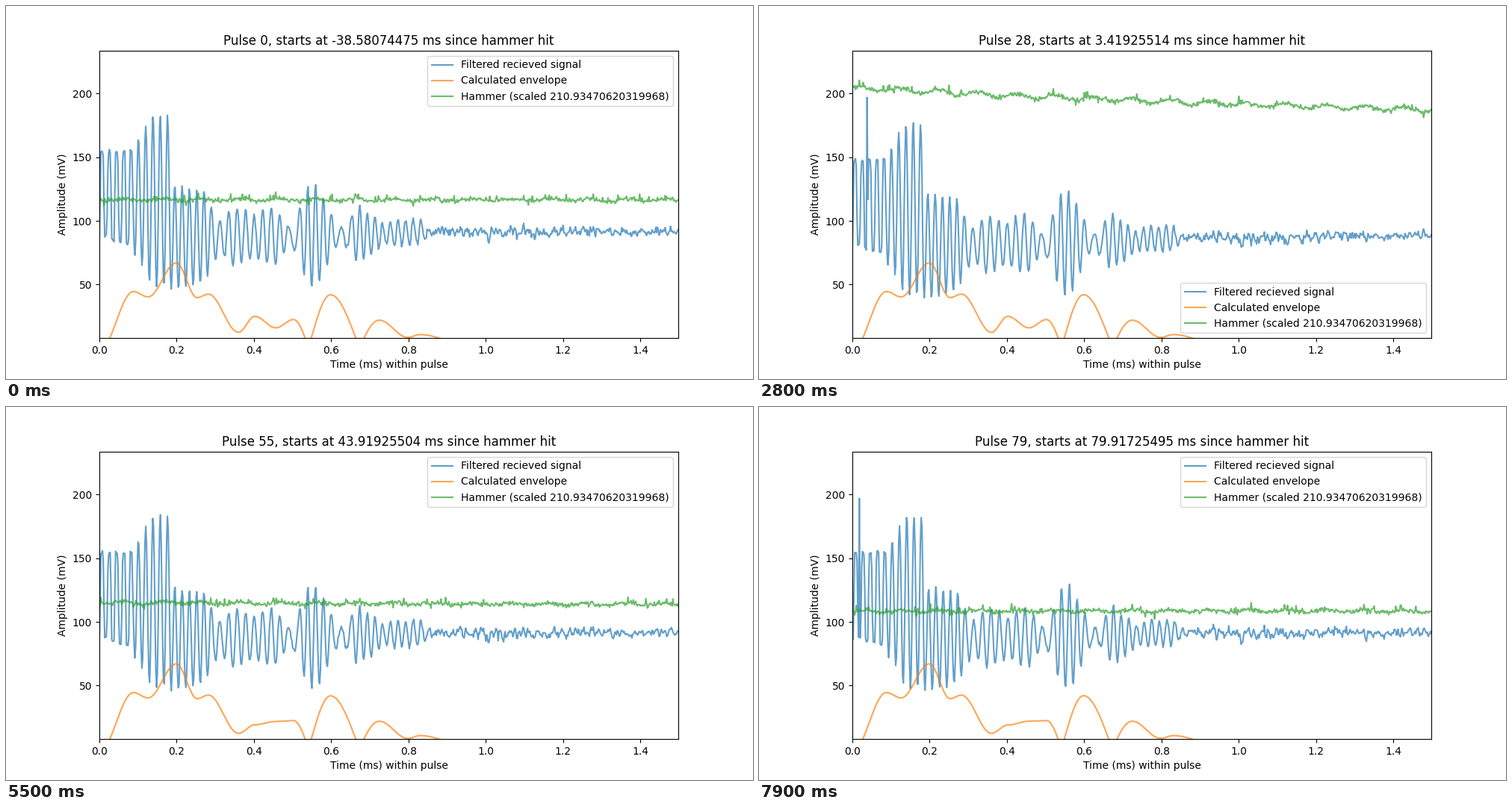
Animation of 1000 by 500 pixels, one loop 8 s. Source, as a matplotlib script:

```python
import numpy as np
import matplotlib.pyplot as plt
from matplotlib.animation import FuncAnimation

PULSES, STEP, DT, N = 80, 1.5, 0.002, 750
LATE = 60  # from this pulse on the trigger comes one sample early
time = np.arange(N) * DT


def ease(x, points):
    """Half-cosine interpolation through (x, y) turning points."""
    xs, ys = np.array(points, float).T
    j = np.clip(np.searchsorted(xs, x, side="right") - 1, 0, len(xs) - 2)
    f = np.clip((x - xs[j]) / (xs[j + 1] - xs[j]), 0, 1)
    return ys[j] + (ys[j + 1] - ys[j]) * (1 - np.cos(np.pi * f)) / 2


def line(x, points):
    return np.interp(x, *np.array(points, float).T)


def bell(x, centre, width):
    return np.exp(-((x - centre) / width) ** 2)


def start_of(n):
    return -38.58074475 + n * (STEP - 3.8e-9) - DT * (n >= LATE)


# Carrier: cycles counted against time, strength and centre line
CYCLES = [(0.0068, 0), (0.2895, 15), (0.3344, 17), (0.489, 24), (0.519, 25),
          (0.5998, 29), (0.6263, 30), (0.6539, 31), (0.852, 41), (1.5, 73)]
STRENGTH = [(0, 33), (0.08, 36), (0.1, 49), (0.14, 68), (0.181, 67), (0.19, 41),
            (0.26, 37), (0.313, 14), (0.345, 23), (0.4, 18), (0.45, 22),
            (0.495, 8), (0.55, 41), (0.627, 8), (0.672, 21), (0.74, 10),
            (0.82, 10), (0.865, 1.2)]
CENTRE = [(0, 121), (0.08, 119), (0.1, 116), (0.181, 116), (0.19, 87),
          (0.5, 88), (0.85, 91), (1.5, 91.5)]
SATURATED = 0.085  # the receiver clips the first few cycles
CYCLE_0 = 52.5 * 0.0068

# Noise that repeats in every pulse
fixed = np.convolve(np.random.default_rng(5).normal(0, 1.4, N), [0.5, 1, 0.5], "same")
fixed += 5 * bell(time, 1.025, 0.003) - 6 * bell(time, 1.009, 0.003)


def received(n, rng):
    t = time - DT * (n >= LATE)
    cycle = line(t, CYCLES) + np.minimum(0, 52.5 * t - CYCLE_0)
    wave = np.cos(2 * np.pi * cycle)
    wave = np.where(t < SATURATED, np.clip(1.8 * wave, -1, 1), wave)
    strength = ease(t, STRENGTH) * (1 + 0.5 * bell(n, 43, 6) * bell(t, 0.36, 0.03))
    y = line(t, CENTRE) + strength * wave
    fade = line(time, [(0, 0.5), (0.8, 0.6), (0.9, 1), (1.1, 0.9), (1.5, 0.7)])
    y += fade * (fixed + rng.normal(0, 1.3, N))
    y += line(start_of(n) + time, [(0, 0), (0.5, -9), (3.4, -7), (4.9, -3), (9, 0)])
    if rng.random() < 0.5:
        y[rng.integers(8, 50)] = rng.choice([50, 191, 197])
    return y


def envelope(n):
    """Signed so that the curve folds sharply where it passes zero."""
    ring = bell(n, 43, 6)
    late = np.clip((n - 46) / 9, 0, 1)
    points = [(0, -2), (0.088, 44.5 - 3 * ring), (0.126, 40.3 + ring), (0.199, 67),
              (0.253, 39.7), (0.282, 42.5), (0.36, 12.5),
              (0.402, 25 + 9 * ring - 6 * late), (0.457, 16 - 11 * ring + 6 * late),
              (0.502, 22.5), (0.598, -42 + 5 * ring), (0.724, 22),
              (0.798, 8.5), (0.83, 10.7), (0.95, 3), (1.5, 1)]
    return np.abs(ease(time, points)) * np.where(time < 0.015, -1, 1)


def hammer(n, rng):
    t = start_of(n) + time
    s = np.maximum(t, 0)
    risen = 1 - bell(s, 0, 1.4)
    ring = 109 + 91 * np.exp(-s / 20) + 186 * np.exp(-s / 1.5) - 11 * bell(s, 60, 16)
    y = 116.5 + risen * (ring - 116.5)
    ripple = 0.9 + 1.5 * risen * np.exp(-s / 8)
    y += ripple * np.sin(2 * np.pi * time / 0.1 + rng.uniform(0, 2 * np.pi))
    y += rng.normal(0, 0.9, N)
    spikes = rng.integers(0, N, 50)
    y[spikes] += rng.choice([-3, 3, 4], 50) * rng.uniform(0.6, 1.3, 50)
    return y


fig, ax = plt.subplots(figsize=(10, 5), dpi=100)
blue, = ax.plot([], [], alpha=0.7, label="Filtered recieved signal")
orange, = ax.plot([], [], alpha=0.7, label="Calculated envelope")
green, = ax.plot([], [], alpha=0.7, label="Hammer (scaled 210.93470620319968)")
ax.set_xlim(0, time[-1])
ax.set_ylim(8.04, 233.64)
ax.set_xlabel("Time (ms) within pulse")
ax.set_ylabel("Amplitude (mV)")
title = ax.set_title("")
ax.legend(loc="best")


def draw(n):
    rng = np.random.default_rng(100 + n)
    blue.set_data(time, received(n, rng))
    orange.set_data(time, envelope(n))
    green.set_data(time, hammer(n, rng))
    title.set_text(f"Pulse {n}, starts at {round(start_of(n), 8)} ms since hammer hit")
    return blue, orange, green, title


anim = FuncAnimation(fig, draw, frames=PULSES, interval=100, repeat=True,
                     repeat_delay=0, blit=False)
plt.show()
```
